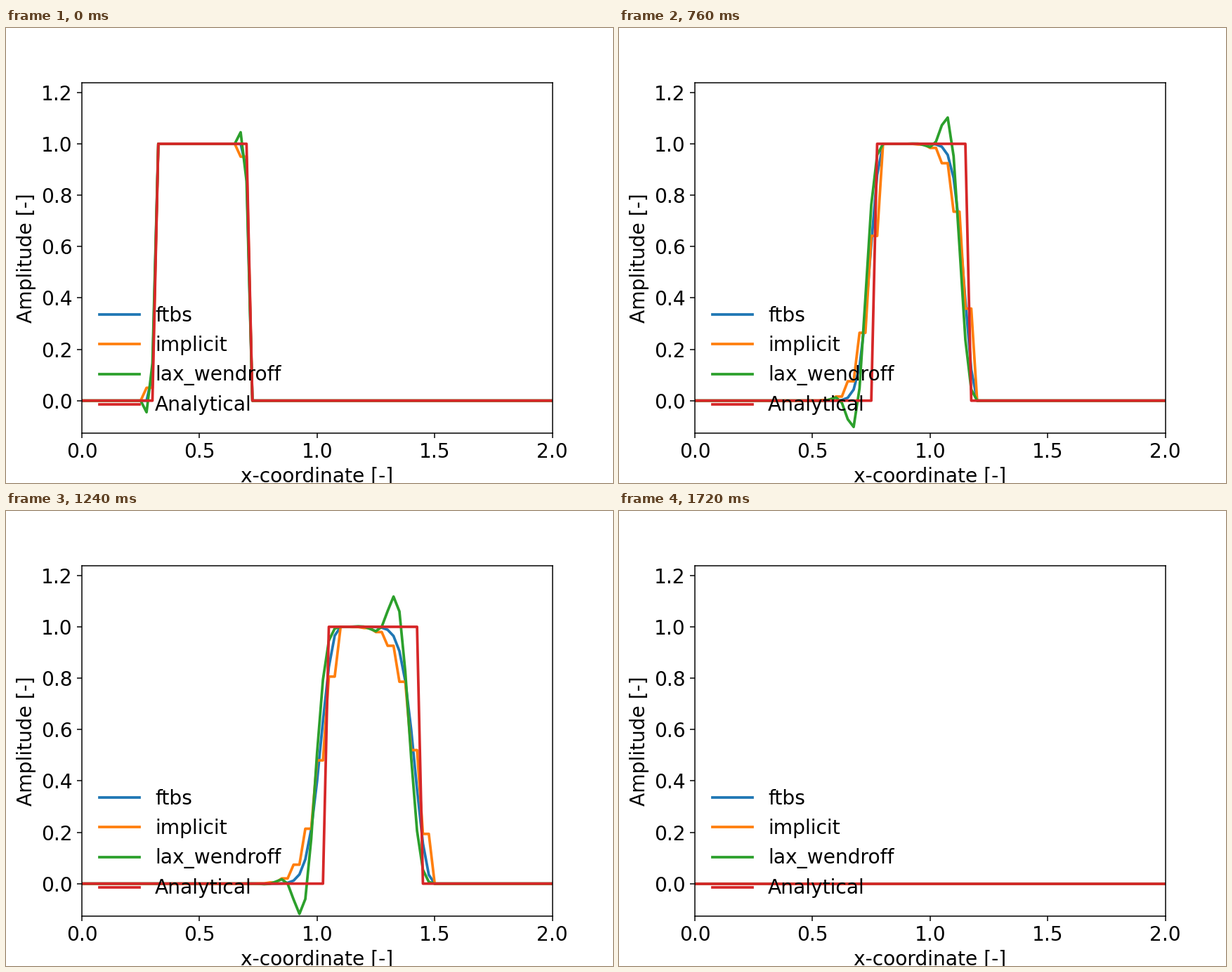
Write a matplotlib script that moves like this. It is 864 by 648 pixels and loops after 1.76 s.

```python
import numpy as np
import matplotlib.pyplot as plt
from matplotlib.animation import FuncAnimation

plt.rcParams.update({"font.family": "DejaVu Sans", "font.size": 15})

FRAMES, INTERVAL = 44, 40
NX, CFL = 81, 0.9
x = np.linspace(0, 2, NX)
cells = np.arange(NX)


def box(shift=0):
    """Unit pulse, moved right by a number of cells."""
    return ((cells >= 12 + shift) & (cells < 28 + shift)).astype(float)


def upwind(u):
    return u - CFL * (u - np.roll(u, 1))


def two_sided(u):
    return (1 + CFL) / 2 * np.roll(u, 1) + (1 - CFL) / 2 * np.roll(u, -1)


def second_order(u):
    left, right = np.roll(u, 1), np.roll(u, -1)
    return u - CFL / 2 * (right - left) + CFL**2 / 2 * (right - 2 * u + left)


def march(step):
    """All time levels after the first step; the last one stays empty."""
    out = np.zeros((FRAMES, NX))
    u = box()
    for n in range(FRAMES - 1):
        u = step(u)
        out[n] = u
    return out


exact = np.zeros((FRAMES, NX))
for n in range(FRAMES - 1):
    exact[n] = box(-(-40 * (n + 1) // 43))

waves = {
    "ftbs": march(upwind),
    "implicit": march(two_sided),
    "lax_wendroff": march(second_order),
    "Analytical": exact,
}
low = min(w.min() for w in waves.values())
high = max(w.max() for w in waves.values())

fig, ax = plt.subplots(figsize=(6.4, 4.8), dpi=135)
fig.subplots_adjust(left=0.125, right=0.9, bottom=0.11, top=0.88)
lines = [ax.plot(x, w[0], lw=2, label=name)[0] for name, w in waves.items()]
ax.set_xlim(0, 2)
ax.set_ylim(low, 1.1 * high)
ax.set_xticks(np.arange(0, 2.1, 0.5))
ax.set_yticks(np.arange(0, 1.3, 0.2))
ax.set_xlabel("x-coordinate [-]")
ax.set_ylabel("Amplitude [-]")
ax.legend(loc="lower left", frameon=False)


def update(n):
    for line, w in zip(lines, waves.values()):
        line.set_ydata(w[n])
    return lines


anim = FuncAnimation(fig, update, frames=FRAMES, interval=INTERVAL,
                     init_func=lambda: update(0), repeat=True, repeat_delay=0)
plt.show()
```
